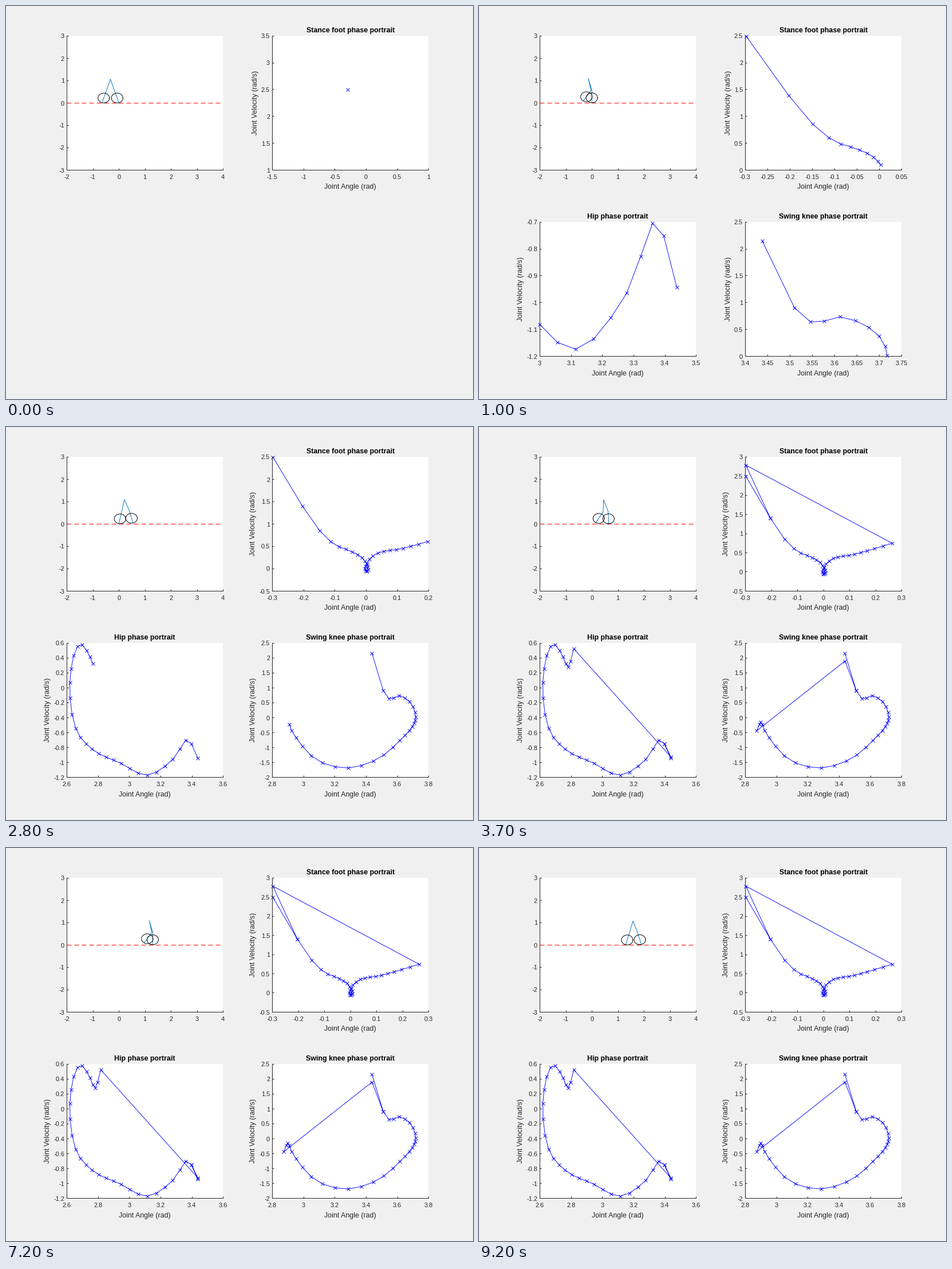
A matplotlib script that plays this animation: 816 px wide and 686 px high, repeating every 9300 ms.

```python
import numpy as np
import matplotlib.pyplot as plt
from matplotlib.animation import FuncAnimation

W, H, DPI = 816, 686, 64
PX = 72 / DPI                      # points per pixel
STEP_FRAMES, STEPS = 31, 3
DT = 0.05
LINK, FOOT_R, STRIDE = 0.55, 0.22, 0.65
INK = (0.15, 0.15, 0.15)
TICK_FONT, LABEL_FONT = 11, 12.4

plt.rcParams["font.family"] = ["Liberation Sans", "DejaVu Sans"]


def smooth(keys, x):
    """Cubic Hermite curve through (time, value) key points."""
    t, v = np.array(keys, float).T
    slope = np.gradient(v, t, edge_order=2)
    i = np.clip(np.searchsorted(t, x, "right") - 1, 0, len(t) - 2)
    h = t[i + 1] - t[i]
    u = (x - t[i]) / h
    ease = u * u * (3 - 2 * u)
    return (v[i] + (v[i + 1] - v[i]) * ease
            + h * u * (1 - u) * (slope[i] * (1 - u) - slope[i + 1] * u))


def joint(keys, start, end, restart_vel):
    """Integrate one stride, then append the samples that close the loop."""
    fine = 20
    k = np.arange((STEP_FRAMES - 1) * fine + 1) / fine
    vel = smooth(keys, k)
    turned = np.cumsum((vel[1:] + vel[:-1]) / 2) * DT / fine
    q = np.append(start, start + turned)
    q = (q + (end - q[-1]) * k / k[-1])[::fine]
    v = vel[::fine]
    return np.append(q, q[:2]), np.append(v, [restart_vel, v[1]])


# Key points of joint velocity, by sample within the stride.
stance = joint([(0, 2.49), (1, 1.39), (2, .85), (3, .6), (5, .427), (7, .31),
                (10, .09), (14, -.07), (17, .05), (21, .345), (25, .45),
                (28, .6), (30, .741)], -.298, .2637, 2.78)
hip = joint([(0, -.945), (1.5, -.705), (4, -.966), (7, -1.175), (10, -1.018),
             (14, -.826), (17, -.545), (20, .065), (23.5, .58), (26, .41),
             (28, .275), (30, .52)], 3.4385, 2.818, -.93)
knee = joint([(0, 2.145), (1, .9), (2, .635), (4, .73), (6, .53), (9, .01),
              (12, -.31), (15, -.78), (18, -1.47), (20, -1.7), (22, -1.53),
              (25, -.685), (28, -.15), (30, -.45)], 3.438, 2.8735, 1.89)

# Hip position ahead of the stance foot during a stride.
hip_path = np.polyfit([0, 10, 21, 30], [-.324, -.137, .042, .28], 3)

fig = plt.figure(figsize=(W / DPI, H / DPI), dpi=DPI, facecolor="#f0f0f0")


def put_text(x, y, text, size, **kw):
    """Write on the figure at a pixel position measured from the top left."""
    kw = {"color": INK, "ha": "center", "va": "baseline", **kw}
    return fig.text(x / W, 1 - y / H, text, fontsize=size * PX, **kw)


def tick_values(lo, hi, most):
    """Round limits and ticks that use at most the given intervals."""
    if lo == hi:
        lo, hi = lo - 1, hi + 1
    for power in range(-4, 3):
        for m in (1, 2, 5):
            step = m * 10.0 ** power
            a = int(np.floor(lo / step + 1e-9))
            b = int(np.ceil(hi / step - 1e-9))
            if b - a <= most:
                return np.arange(a, b + 1) * step


def text_width(s):
    widths = {".": .278, "-": .333}
    return TICK_FONT * sum(widths.get(c, .556) for c in s)


class Panel:
    WIDTH, HEIGHT = 273, 234

    def __init__(self, left, top, title=None):
        self.left, self.bottom = left, top + self.HEIGHT
        self.ax = fig.add_axes([left / W, 1 - self.bottom / H,
                                self.WIDTH / W, self.HEIGHT / H])
        self.ax.spines[["top", "right"]].set_visible(False)
        self.ax.spines[["left", "bottom"]].set(linewidth=PX, color=INK)
        self.ax.tick_params(direction="in", length=3 * PX, width=PX,
                            color=INK, labelleft=False, labelbottom=False)
        self.tick_texts, self.names = [], []
        if title:
            self.add_plot(title, left + self.WIDTH / 2, top)

    def add_plot(self, title, mid, top):
        self.y_name = put_text(self.left, top + self.HEIGHT / 2,
                               "Joint Velocity (rad/s)", LABEL_FONT,
                               rotation=90, rotation_mode="anchor")
        self.names = [
            self.y_name,
            put_text(mid, top - 6, title, LABEL_FONT,
                     weight="bold", color="black"),
            put_text(mid, self.bottom + 33.7, "Joint Angle (rad)",
                     LABEL_FONT)]
        self.line, = self.ax.plot([], [], "-x", color="blue", lw=.9 * PX,
                                  ms=5.2 * PX, mew=.9 * PX, clip_on=False)

    def set_ticks(self, xt, yt):
        self.ax.set(xlim=(xt[0], xt[-1]), ylim=(yt[0], yt[-1]),
                    xticks=xt, yticks=yt)
        for t in self.tick_texts:
            t.remove()
        xs = np.linspace(self.left, self.left + self.WIDTH, len(xt))
        ys = np.linspace(self.bottom, self.bottom - self.HEIGHT, len(yt))
        y_labels = [f"{v:.5g}" for v in yt]
        self.tick_texts = [
            put_text(x, self.bottom + 16.2, f"{v:.5g}", TICK_FONT)
            for x, v in zip(xs, xt)]
        self.tick_texts += [
            put_text(self.left - 4.3, y + 4.7, s, TICK_FONT, ha="right")
            for y, s in zip(ys, y_labels)]
        if self.names:
            widest = max(map(text_width, y_labels))
            self.y_name.set_x((self.left - 11 - widest) / W)

    def show(self, data, count):
        visible = count > 0
        if visible:
            q, v = data[0][:count], data[1][:count]
            self.line.set_data(q, v)
            self.set_ticks(tick_values(q.min(), q.max(), 8),
                           tick_values(v.min(), v.max(), 9))
        self.ax.set_visible(visible)
        for t in self.names + self.tick_texts:
            t.set_visible(visible)


# Edges sit just inside a pixel so that axis lines snap to it.
COLS, ROWS = (106.2, 465.3), (51.8, 376.8)
walker = Panel(COLS[0], ROWS[0])
walker.set_ticks(np.arange(-2, 5), np.arange(-3, 4))
stance_plot = Panel(COLS[1], ROWS[0], "Stance foot phase portrait")
hip_plot = Panel(COLS[0], ROWS[1], "Hip phase portrait")
knee_plot = Panel(COLS[1], ROWS[1], "Swing knee phase portrait")

walker.ax.plot([-2, 4], [0, 0], color="red", lw=PX, dashes=(8, 5))
legs, = walker.ax.plot([], [], color="#0072bd", lw=.95 * PX)
feet = [walker.ax.plot([], [], color="black", lw=.95 * PX)[0]
        for _ in range(2)]
turn = np.linspace(0, 2 * np.pi, 73)


def along(angle, length=LINK):
    """Vector at an angle measured clockwise from straight up."""
    return length * np.array([np.sin(angle), np.cos(angle)])


def pose(n):
    stride, k = divmod(n, STEP_FRAMES)
    shank, swing_thigh, swing_shank = stance[0][k], hip[0][k], knee[0][k]
    thigh = np.arcsin(np.polyval(hip_path, k) / LINK - np.sin(shank))
    foot = np.array([stride * STRIDE, 0.0])
    chain = [foot]
    for angle in (shank, thigh, swing_thigh, swing_shank):
        chain.append(chain[-1] + along(angle))
    centres = (foot + along(shank, FOOT_R),
               chain[-1] - along(swing_shank, FOOT_R))
    return np.array(chain), centres


def update(n):
    chain, centres = pose(n)
    legs.set_data(*chain.T)
    for ring, (x, y) in zip(feet, centres):
        ring.set_data(x + FOOT_R * np.cos(turn), y + FOOT_R * np.sin(turn))
    stance_plot.show(stance, n + 1)
    # The lower plots trail by one sample.
    hip_plot.show(hip, n)
    knee_plot.show(knee, n)
    return []


anim = FuncAnimation(fig, update, frames=STEP_FRAMES * STEPS, interval=100,
                     init_func=lambda: [], repeat=True, blit=False)
plt.show()
```
